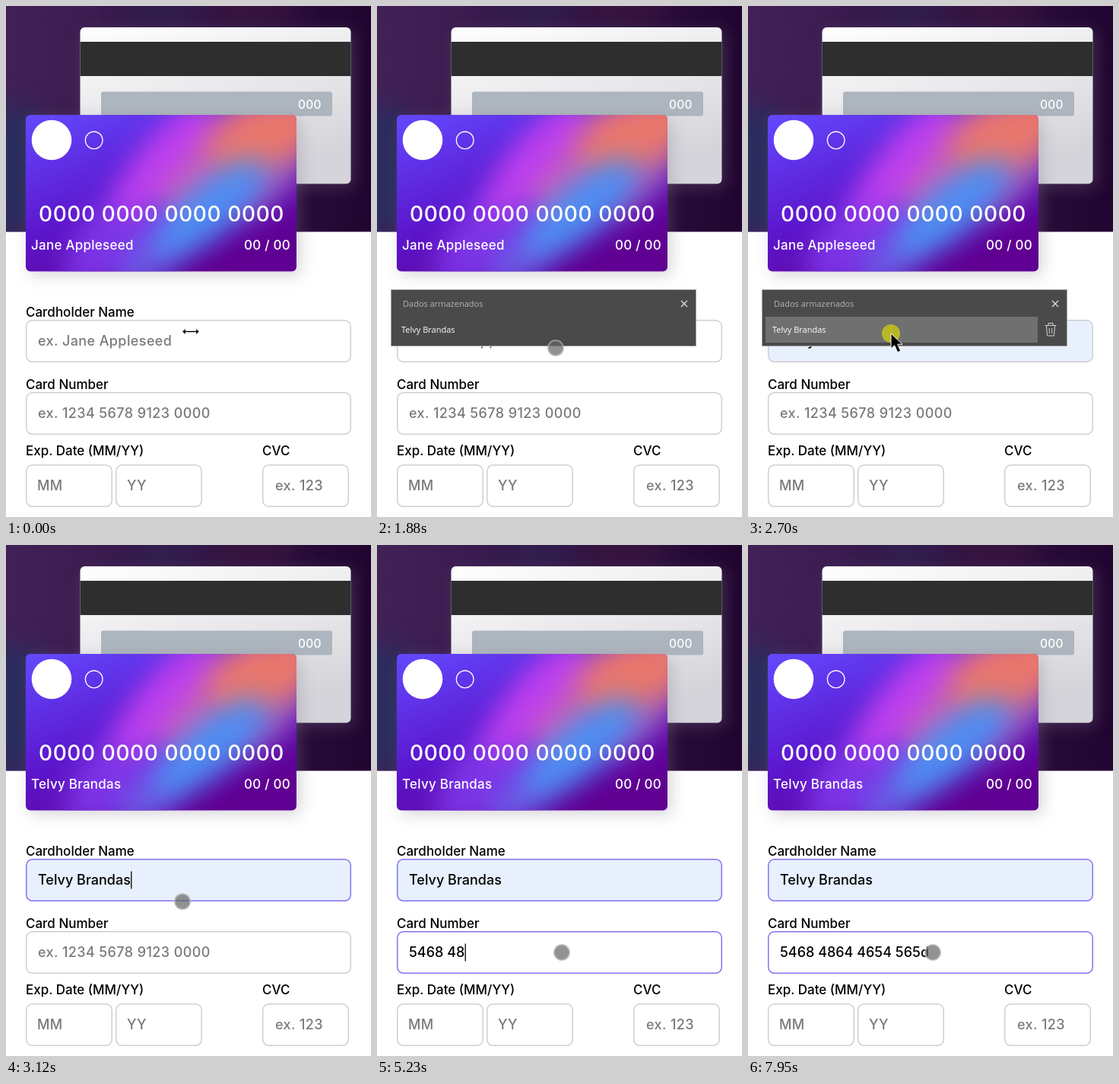
Write an HTML page that moves like this. It is 480 px wide and 671 px high and loops after 8000 ms.

```html
<!DOCTYPE html>
<html lang="en">
<head>
<meta charset="utf-8">
<title>Card form</title>
<style>
html, body { margin: 0; width: 100%; height: 100%; overflow: hidden; background: #fff; }
#stage { display: block; width: 480px; height: 671px; font: 500 17px Inter, sans-serif; }
text { white-space: pre; }
.card { filter: drop-shadow(5px 5px 10px rgba(128, 118, 138, .32)); }
.soft { filter: blur(17px); }
.onCard { fill: #fff; letter-spacing: .25px; }
.hint { font-size: 18px; fill: #7a7a7a; letter-spacing: .4px; }
.value { font-size: 18px; }
.box { fill: #fff; stroke: #cfcfcf; stroke-width: 1.5; }
.filled { stroke: #8273f2; }
.auto { fill: #e8f0fe; }
#menu { font: 400 11px "Open Sans", sans-serif; }
</style>
</head>
<body>
<svg id="stage" viewBox="0 0 480 671">
  <defs>
    <linearGradient id="heroFill">
      <stop stop-color="#422157"/><stop offset=".5" stop-color="#331548"/><stop offset="1" stop-color="#210530"/>
    </linearGradient>
    <linearGradient id="backFill" x2=".4" y2="1">
      <stop stop-color="#fff"/><stop offset=".25" stop-color="#f4f4f5"/><stop offset="1" stop-color="#d5d4da"/>
    </linearGradient>
    <linearGradient id="frontFill" x2=".65" y2="1">
      <stop stop-color="#6349ff"/><stop offset=".55" stop-color="#5c16cc"/><stop offset="1" stop-color="#600092"/>
    </linearGradient>
    <clipPath id="frontClip"><rect x="26" y="143" width="356" height="205.500" rx="6"/></clipPath>
  </defs>

  <svg width="480" height="296.400">
    <rect width="480" height="297" fill="url(#heroFill)"/>
    <g class="soft">
      <ellipse cx="5" cy="215" rx="65" ry="85" fill="#2b2d5e"/>
      <ellipse cx="210" cy="8" rx="50" ry="18" fill="#30214f"/>
      <ellipse cx="325" cy="5" rx="60" ry="18" fill="#3c1740"/>
    </g>
  </svg>

  <rect class="card" x="97.500" y="28" width="356" height="205.500" rx="6" fill="url(#backFill)"/>
  <rect x="97.500" y="47" width="356" height="45" fill="#2e2e2e"/>
  <rect x="125" y="112.500" width="304" height="32" rx="3" fill="#adb5be"/>
  <text class="onCard" x="384" y="135" font-size="15.500">000</text>

  <rect class="card" x="26" y="143" width="356" height="205.500" rx="6" fill="url(#frontFill)"/>
  <g clip-path="url(#frontClip)">
    <g class="soft">
      <ellipse cx="180" cy="265" rx="140" ry="48" fill="#7c34e6" transform="rotate(-45 180 265)"/>
      <ellipse cx="330" cy="222" rx="95" ry="40" fill="#9c62c0" transform="rotate(-40 330 222)"/>
      <ellipse cx="275" cy="190" rx="100" ry="36" fill="#c862b0" transform="rotate(-42 275 190)"/>
      <ellipse cx="205" cy="200" rx="95" ry="29" fill="#bd40ee" transform="rotate(-50 205 200)"/>
      <ellipse cx="348" cy="165" rx="85" ry="43" fill="#e8766c" transform="rotate(-25 348 165)"/>
      <ellipse cx="215" cy="310" rx="90" ry="30" fill="#6a58e4" transform="rotate(-42 215 310)"/>
      <ellipse cx="268" cy="266" rx="92" ry="35" fill="#4f8cf0" transform="rotate(-40 268 266)"/>
    </g>
  </g>
  <circle cx="60" cy="176" r="26.300" fill="#fff"/>
  <circle cx="115.700" cy="176.300" r="11.300" fill="none" stroke="#fff" stroke-width="1.300"/>
  <text class="onCard" x="43" y="282.500" style="font-size:28px;letter-spacing:.6px">0000 0000 0000 0000</text>
  <text class="onCard" id="cardName" x="33" y="320"></text>
  <text class="onCard" x="374" y="320" text-anchor="end">00 / 00</text>

  <text x="26" y="408">Cardholder Name</text>
  <text x="26" y="503">Card Number</text>
  <text x="26" y="590">Exp. Date (MM/YY)</text>
  <text x="337" y="590">CVC</text>
  <rect class="box" id="nameBox" x="26.750" y="412.750" width="426.500" height="54.500" rx="8"/>
  <rect class="box" id="numBox" x="26.750" y="507.750" width="426.500" height="54.500" rx="8"/>
  <rect class="box" x="26.750" y="602.750" width="112.500" height="54.500" rx="8"/>
  <rect class="box" x="144.750" y="602.750" width="112.500" height="54.500" rx="8"/>
  <rect class="box" x="337.750" y="602.750" width="112.500" height="54.500" rx="8"/>
  <text id="nameText" x="42" y="446"></text>
  <text id="numText" x="42" y="541"></text>
  <text class="hint" x="41" y="636">MM</text>
  <text class="hint" x="159" y="636">YY</text>
  <text class="hint" x="354" y="636">ex. 123</text>
  <rect id="caret" width="1.300" height="23"/>

  <g id="menu">
    <rect x="18.500" y="372.500" width="401" height="74" fill="#4a4a4a" stroke="#a8a8a8"/>
    <text x="34" y="395" fill="#b4b4b4">Dados armazenados</text>
    <path d="M400 387l8 8m0-8l-8 8" stroke="#e4e4e4" stroke-width="1.200"/>
    <g id="hover">
      <rect x="23" y="408" width="358" height="34" fill="#707070"/>
      <path d="M390.500 419.500h15M395 419v-2.500h6v2.500M392.500 420l1 13h9l1-13M396.300 423v7M399.700 423v7" fill="none" stroke="#d0d0d0"/>
    </g>
    <text id="saved" x="32" y="429" fill="#fff"></text>
  </g>

  <g id="pointer">
    <path id="resize" d="M-11 0l4-4v3h14v-3l4 4l-4 4v-3h-14v3z" stroke="#fff" stroke-width=".6"/>
    <circle id="dot" r="10" fill="rgba(100,100,100,.7)" stroke="rgba(175,175,175,.7)" stroke-width="2"/>
    <g id="arrow">
      <circle r="12" fill="rgba(196,192,28,.88)"/>
      <path d="M0 0v20l4.700-4.300l4 9l4-1.800l-4-8.700h6.300z" stroke="#fff"/>
    </g>
  </g>
</svg>
<script>
const LOOP = 8000;
const HOLDER = "Telvy Brandas";
const SAMPLE = "Jane Appleseed";
const DIGITS = "5468 4864 4654 565d";
// [time, characters typed]
const typing = [[4500, 1], [4710, 3], [4920, 4], [5030, 6], [5230, 7], [5360, 8], [5490, 9], [5690, 11],
  [5760, 12], [5960, 13], [6170, 14], [6500, 16], [7100, 17], [7220, 18], [7420, 19]];
// [time, x, y]
const path = [[0, 243, 427.5], [70, 242, 428], [330, 242, 428], [760, 235, 449], [2170, 235, 449],
  [2650, 188, 430], [2850, 188, 430], [3120, 232, 468], [3580, 243, 533], [3720, 243, 535], [LOOP, 243, 535]];
const PICK = 2830;

const $ = id => document.getElementById(id);
const within = (t, a, b) => t >= a && t < b;
const show = (id, on) => $(id).setAttribute("visibility", on ? "visible" : "hidden");

function pointerAt(t) {
  const i = path.findIndex(p => p[0] > t);
  const [a, b] = [path[i - 1], path[i]];
  const k = (t - a[0]) / (b[0] - a[0]);
  return [a[1] + (b[1] - a[1]) * k, a[2] + (b[2] - a[2]) * k];
}

function setField(id, value, hint) {
  $(id).textContent = value || hint;
  $(id).setAttribute("class", value ? "value" : "hint");
}

function placeCaret(t) {
  const onName = within(t, 700, 1880) || within(t, 2900, 3400);
  const onNumber = within(t, 3720, 4240) || within(t, 4500, 7030) || within(t, 7100, 7950);
  show("caret", onName || onNumber);
  if (!onName && !onNumber) return;
  const empty = onName ? t < PICK : t < typing[0][0];
  const text = $(onName ? "nameText" : "numText");
  $("caret").setAttribute("x", 42.3 + (empty ? 0 : text.getComputedTextLength()));
  $("caret").setAttribute("y", onName ? 428.5 : 523.5);
}

function draw(t) {
  const picked = t >= PICK;
  const hovered = within(t, 2360, PICK);
  const typed = DIGITS.slice(0, typing.reduce((n, [at, len]) => t >= at ? len : n, 0));

  $("cardName").textContent = picked ? HOLDER : SAMPLE;
  setField("nameText", picked || hovered ? HOLDER : "", "ex. " + SAMPLE);
  setField("numText", typed, "ex. 1234 5678 9123 0000");
  $("nameBox").setAttribute("class", "box" + (picked ? " filled" : "") + (picked || hovered ? " auto" : ""));
  $("numBox").setAttribute("class", "box" + (typed ? " filled" : ""));
  placeCaret(t);

  show("menu", within(t, 1880, PICK));
  show("hover", hovered);
  const arrow = within(t, 2290, PICK + 30);
  show("resize", t < 70);
  show("arrow", arrow);
  show("dot", t >= 70 && !arrow);
  $("pointer").setAttribute("transform", `translate(${pointerAt(t)})`);
}

$("saved").textContent = HOLDER;
const start = performance.now();
function tick() {
  draw((performance.now() - start) % LOOP);
  requestAnimationFrame(tick);
}
tick();
</script>
</body>
</html>
```
